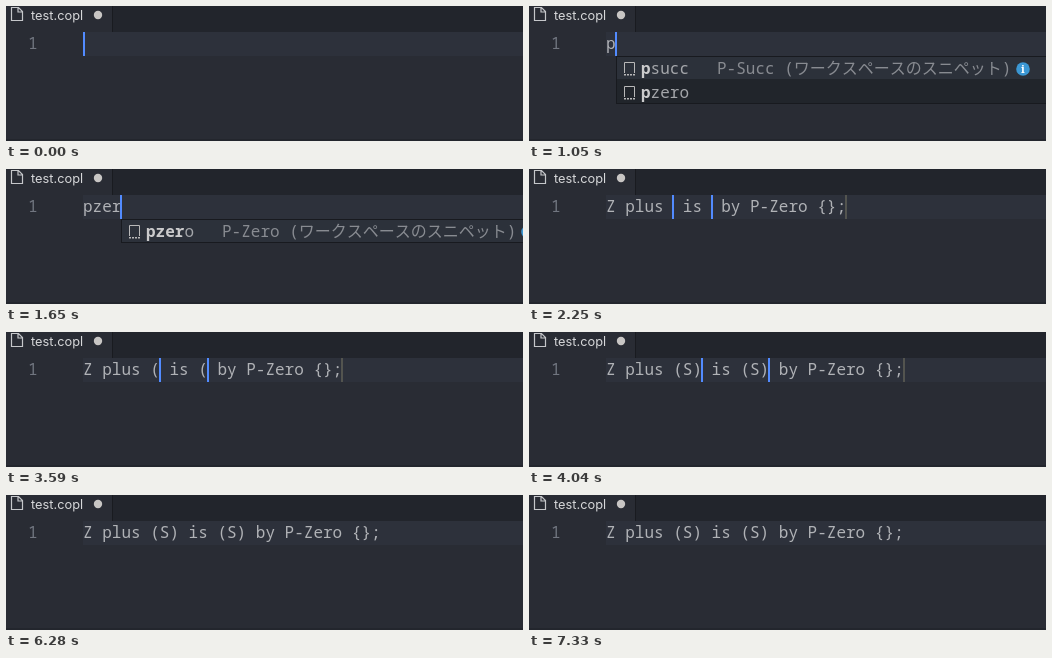
Recreate the animation shown at these times as an HTML page with a canvas. Size 517 px wide and 135 px high, loop 7.63 s.

```html
<!DOCTYPE html>
<html lang="ja">
<head>
<meta charset="utf-8">
<style>
  html, body { margin: 0; width: 100%; height: 100%; overflow: hidden; background: #292c34; }
  canvas { display: block; }
</style>
</head>
<body>
<canvas id="stage" width="517" height="135"></canvas>
<script>
const ctx = document.getElementById('stage').getContext('2d');
const LOOP = 7630, LEFT = 77, CHAR = 9.6, ROW = 24;
const MONO = '"Noto Sans Mono", "Noto Sans CJK JP", "Noto Sans CJK", monospace';
const UI = 'Inter, sans-serif';

// In a line, | is a caret and ^ the final snippet stop.
// "typed" is how many letters the popup has matched.
const steps = [
  { at: 0, line: '|' },
  { at: 450, line: '' },
  { at: 1050, line: 'p|', typed: 1 },
  { at: 1200, line: 'pz|', typed: 2 },
  { at: 1500, line: 'pze|', typed: 3 },
  { at: 1650, line: 'pzer|', typed: 4 },
  { at: 1800, line: 'pzero|', typed: 4 },
  { at: 1950, line: 'pzero|', typed: 5 },
  { at: 2250, line: 'Z plus | is | by P-Zero {};^' },
  { at: 2850, line: 'Z plus  is  by P-Zero {};^' },
  { at: 3300, line: 'Z plus | is | by P-Zero {};^' },
  { at: 3590, line: 'Z plus (| is (| by P-Zero {};^' },
  { at: 3890, line: 'Z plus (S| is (S| by P-Zero {};^' },
  { at: 4040, line: 'Z plus (S)| is (S)| by P-Zero {};^' },
  { at: 4190, line: 'Z plus (S)| is (S)| by P-Zero {};^', matched: true },
  { at: 4640, line: 'Z plus (S) is (S) by P-Zero {};^', matched: true },
  { at: 4790, line: 'Z plus (S) is (S) by P-Zero {};|' },
  { at: 5230, line: 'Z plus (S) is (S) by P-Zero {};' },
  { at: 5830, line: 'Z plus (S) is (S) by P-Zero {};|' },
  { at: 6280, line: 'Z plus (S) is (S) by P-Zero {};' },
  { at: 6730, line: 'Z plus (S) is (S) by P-Zero {};|' },
  { at: 7330, line: 'Z plus (S) is (S) by P-Zero {};' }
];

function rect(x, y, w, h, color) {
  ctx.fillStyle = color;
  ctx.fillRect(x, y, w, h);
}

function text(str, x, y, color, font = `16px ${MONO}`) {
  ctx.font = font;
  ctx.fillStyle = color;
  ctx.fillText(str, x, y);
}

function disc(x, y, r, color) {
  ctx.fillStyle = color;
  ctx.beginPath();
  ctx.arc(x, y, r, 0, Math.PI * 2);
  ctx.fill();
}

function stroke(path, color, width) {
  ctx.strokeStyle = color;
  ctx.lineWidth = width;
  ctx.stroke(new Path2D(path));
}

function drawWindow() {
  rect(0, 0, 517, 135, '#292c34');
  rect(106, 0, 411, 26, '#22252c');
  rect(106, 0, 1, 26, '#191b20');
  rect(0, 133, 517, 2, '#23262d');
  rect(LEFT, 26, 440, ROW, '#2d313b');
  stroke('M5.5 1.5H12.5L16.5 5.5V14.5H5.5ZM12 2V6H16', '#c5c7ca', 1.2);
  text('test.copl', 25, 14, '#d7d8da', `12.8px ${UI}`);
  disc(92, 9, 4.2, '#c8c6c4');
  text('1', 22, 43, '#717680');
}

function drawLine({ line, matched }) {
  let column = 0;
  for (const char of line) {
    const x = LEFT + column * CHAR;
    if (char === '|' || char === '^') {
      const caretX = Math.max(LEFT, Math.round(x - 1));
      rect(caretX, 26, 2, ROW, char === '|' ? '#528bff' : '#53544f');
      continue;
    }
    if (matched && '()'.includes(char)) {
      ctx.strokeStyle = '#6f747d';
      ctx.lineWidth = 1;
      ctx.strokeRect(Math.round(x) + 0.5, 26.5, 8, ROW - 1);
    }
    text(char, x, 43, '#b0b2b6');
    column++;
  }
}

function drawSuggestion(word, typed, x, y) {
  stroke(`M${x + 8.5} ${y + 17}V${y + 6.5}H${x + 18.5}V${y + 17}`, '#b8b8b8', 1);
  for (let i = 0; i < 4; i++) rect(x + 8 + i * 3, y + 18, 2, 1.5, '#b8b8b8');
  const head = word.slice(0, typed);
  text(head, x + 25, y + 18, '#cbcbcc', `bold 16px ${MONO}`);
  text(word.slice(typed), x + 25 + typed * CHAR, y + 18, '#a4a6aa');
}

function drawPopup({ line, typed }) {
  const x = Math.round(LEFT + (line.length - 1) * CHAR);
  const words = typed === 1 ? ['psucc', 'pzero'] : ['pzero'];
  const rule = typed === 1 ? 'P-Succ' : 'P-Zero';
  const height = words.length * ROW;
  rect(x, 50, 432, height, '#181a1f');
  rect(x + 1, 51, 430, height - 2, '#21252b');
  rect(x + 1, 51, 430, ROW - 2, '#2c313a');
  words.forEach((word, i) => drawSuggestion(word, typed, x, 50 + i * ROW));
  text(`${rule} (ワークスペースのスニペット)`, x + 101, 68, '#888b91');
  disc(x + 407, 63, 6.8, '#3b97d3');
  text('i', x + 405, 67, '#fff', 'bold 11px "Noto Serif", serif');
}

function render(now) {
  const time = now % LOOP;
  const step = steps.findLast(s => s.at <= time);
  drawWindow();
  drawLine(step);
  if (step.typed) drawPopup(step);
  requestAnimationFrame(render);
}

render(performance.now());
</script>
</body>
</html>
```
